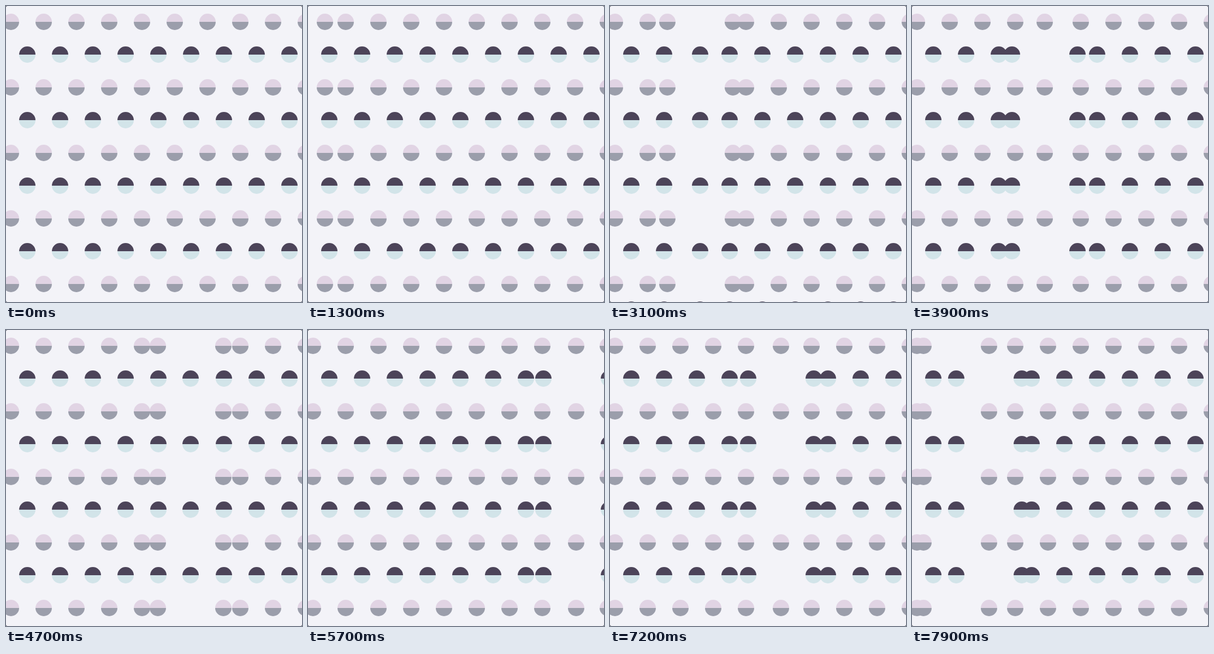
Recreate the animation shown at these times as an HTML page with a canvas. Size 542 by 542 pixels, loop 8 s.

```html
<!DOCTYPE html>
<html lang="en">
<head>
<meta charset="utf-8">
<title>Dots and lens</title>
<style>
  html, body { margin: 0; width: 100%; height: 100%; overflow: hidden; background: #55555c; }
  canvas { display: block; background: #f3f3f8; border-radius: 3px; }
</style>
</head>
<body>
<canvas id="stage" width="542" height="542"></canvas>
<script>
const ctx = document.getElementById('stage').getContext('2d');
const SIZE = 542, LOOP = 8000, STEP = 100;
const GAP = 60, RADIUS = 15, REACH = 50;
const LIGHT = ['#e1d4e4', '#9b9eab'];
const DARK = ['#4c4459', '#d2e4e9'];

// Sweep right with a short pause, turn, and sweep back: [time, x]
const sweep = [[900, -38], [2200, 42], [3100, 153], [4100, 281],
  [4300, 281], [5700, 487], [6340, 537], [7900, 117]];

function lensX(time) {
  if (time < sweep[0][0]) return -GAP;
  const next = sweep.findIndex(([t]) => t > time);
  if (next < 0) return sweep.at(-1)[1];
  const [t0, x0] = sweep[next - 1], [t1, x1] = sweep[next];
  return x0 + (x1 - x0) * (time - t0) / (t1 - t0);
}

// The lens stays below the stage and dips once, lifting the hidden bottom row into view
const lensY = time => Math.max(572, 594 - 0.017 * Math.abs(time - 2400));

// Near the lens, distances from its centre are doubled
function magnify(position, centre) {
  const offset = position - centre;
  return Math.abs(offset) < REACH ? position + offset : position;
}

function drawHalf(x, y, color, startAngle) {
  ctx.fillStyle = color;
  ctx.beginPath();
  ctx.arc(x, y, RADIUS, startAngle, startAngle + Math.PI);
  ctx.fill();
}

function draw(now) {
  const time = Math.floor(now % LOOP / STEP) * STEP;
  const cx = Math.round(lensX(time));
  const cy = Math.round(lensY(time));
  ctx.clearRect(0, 0, SIZE, SIZE);
  for (let row = 0; row < 10; row++) {
    const odd = row % 2;
    const [top, bottom] = odd ? DARK : LIGHT;
    const y = magnify(29 + row * GAP, cy);
    for (let col = 0; col < 10; col++) {
      const x = magnify(9 + (col + odd / 2) * GAP, cx);
      drawHalf(x, y, top, Math.PI);
      drawHalf(x, y, bottom, 0);
    }
  }
}

const start = performance.now();
function tick() {
  draw(performance.now() - start);
  requestAnimationFrame(tick);
}
tick();
</script>
</body>
</html>
```
